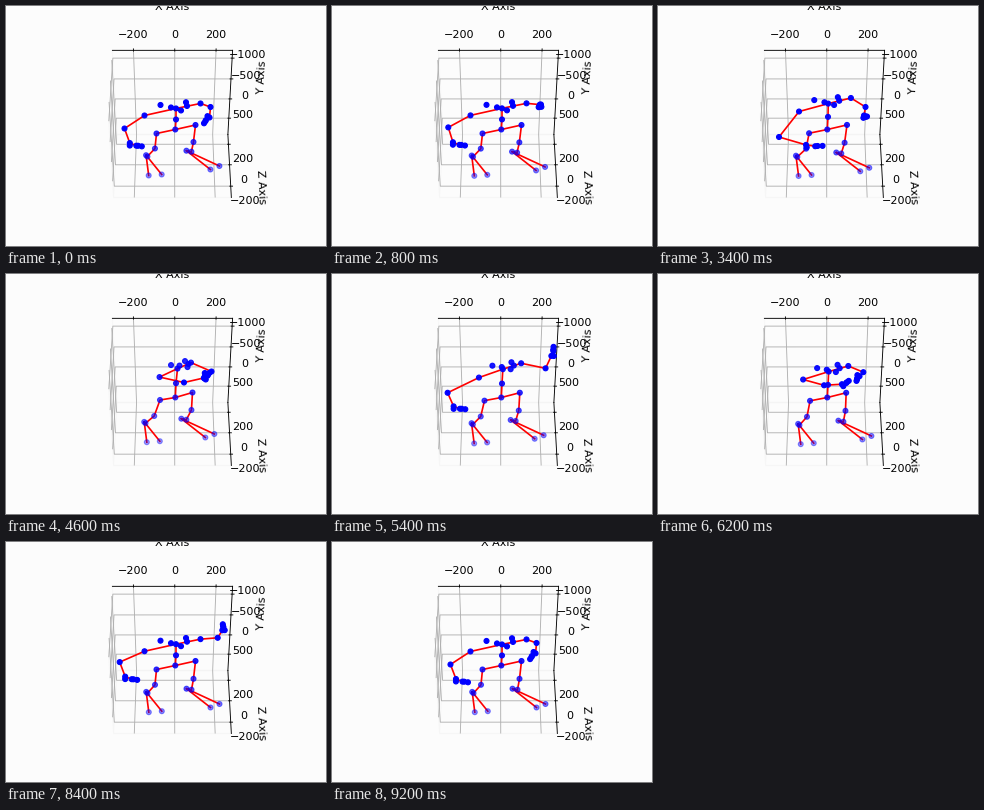
Animation, 320 px wide and 240 px high, one loop 9400 ms. Source, as a matplotlib script:

```python
import numpy as np
import matplotlib.pyplot as plt
from matplotlib.animation import FuncAnimation

FRAMES, STEP = 47, 200  # count, ms per frame
PAPER = "#fcfcfc"

# Standing pose in stage pixels, y pointing down
REST = {
    "pelvis": (168.8, 123), "spine": (169.5, 113), "neck": (169.5, 102),
    "l_shoulder": (138, 109), "r_shoulder": (194, 97),
    "l_hip": (150, 127), "r_hip": (189, 118.5),
    "l_knee": (148.5, 142), "l_ankle": (141, 150), "l_heel": (139.7, 148.7),
    "l_foot": (142.3, 169), "l_toe": (155.3, 168),
    "r_knee": (187, 135.5), "r_ankle": (185, 145.2), "r_heel": (180, 144.2),
    "r_foot": (204, 163), "r_toe": (213, 159.5),
}

# How far the trunk follows a full turn sideways and a full lift upwards
TURN = {"neck": (1.5, 0), "l_shoulder": (15, 0), "r_shoulder": (-9.5, 0),
        "l_hip": (3.5, -1.5), "r_hip": (-3, -.5)}
LIFT = {"neck": 8, "spine": 4.3, "l_shoulder": 6.5, "r_shoulder": 9}

# Head dots: offset from the neck and its change when the head turns
HEAD = [(-15.5, -3.5, 9, 0), (-5, -1, 7, -2), (5, 2, 5, -3.5),
        (10, -6.2, -2.5, -1.3), (11, -2.5, 0, -2)]

# Arm poses: elbow, wrist, fingertip
ARM = ("elbow", "wrist", "tip")
L_HANG = np.array([(118, 122), (123.5, 136.5), (135.5, 139.8)])
L_LOW = np.array([(120.5, 130.5), (151, 137), (167.5, 138)])
L_CROSS = np.array([(177.5, 108), (198.5, 103), (204, 98)])
R_HANG = np.array([(204, 100.5), (203, 111), (197.5, 116.8)])
R_LOW = np.array([(207, 100.5), (205.5, 109), (208.5, 110)])
R_CROSS = np.array([(205, 97), (200.5, 99.5), (198, 104)])
R_RAISED = np.array([(213, 94), (219, 82), (221, 73)])

CHAINS = [
    "pelvis spine neck", "neck l_shoulder l_elbow l_wrist l_mid",
    "neck r_shoulder r_elbow r_wrist r_mid",
    "pelvis l_hip l_knee l_ankle l_heel l_foot", "l_heel l_toe",
    "pelvis r_hip r_knee r_ankle r_heel r_foot", "r_heel r_toe",
]


def bump(t, peak, width):
    return np.exp(-((t - peak) / width) ** 2)


def turn_at(t):
    return bump(t, 4.6, .9) + .4 * bump(t, 6.2, .7)


def pose_trunk(t):
    turn, lift = turn_at(t), bump(t, 4.8, 2)
    p = {name: np.array(xy, float) for name, xy in REST.items()}
    for name, shift in TURN.items():
        p[name] += turn * np.array(shift)
    for name, rise in LIFT.items():
        p[name][1] -= rise * lift
    for k, (x, y, dx, dy) in enumerate(HEAD):
        p[f"head{k}"] = p["neck"] + (x + dx * turn, y + dy * turn)
    return p


def sway_legs(p, t):
    drift, dip, settle = bump(t, 2.8, 1.6), bump(t, 4.6, .8), 1 - bump(t, 0, 1)
    sway = {"l": np.array([-2.4 * drift - 1.3 * dip, .7 * settle - 2 * dip]),
            "r": np.array([-2 * drift - 4.6 * dip, 2 * settle - 2 * dip])}
    for side in "lr":
        p[side + "_knee"] += .4 * sway[side]
        for part in ("ankle", "heel", "foot", "toe"):
            p[f"{side}_{part}"] += sway[side]


def move_arms(p, t):
    low, drift = bump(t, 3.4, .35), bump(t, 2.8, 1.6)
    cross = bump(t, 4.6, .4) + .8 * bump(t, 6.2, .45)
    lift = (bump(t, 1.1, .3) + bump(t, 5.4, .3)
            + .8 * bump(t, 6.8, .25) + .8 * bump(t, 8.4, .35))
    left = L_HANG + low * (L_LOW - L_HANG) + cross * (L_CROSS - L_HANG)
    left += lift * np.array([-6, -3])
    left[1:] += drift * np.array([-4, 1.6])
    right = R_HANG + low * (R_LOW - R_HANG) + cross * (R_CROSS - R_HANG)
    right += lift * (R_RAISED - R_HANG)
    for side, arm in (("l", left), ("r", right)):
        for part, xy in zip(ARM, arm):
            p[f"{side}_{part}"] = xy
        add_hand(p, side)


def add_hand(p, side):
    wrist, tip = p[side + "_wrist"], p[side + "_tip"]
    along = tip - wrist
    across = np.array([-along[1], along[0]]) / max(np.hypot(*along), 1)
    for part, reach, spread in (("thumb", .05, 2.4), ("mid", .56, .8), ("ring", .7, .4)):
        p[f"{side}_{part}"] = wrist + reach * along + spread * across


def pose(t):
    p = pose_trunk(t)
    sway_legs(p, t)
    move_arms(p, t)
    return p


def shades(p, t):
    """Body dots fade towards the feet; the arms stay in front."""
    rgba = np.tile([0, 0, 1.0, 1.0], (len(p), 1))
    for row, (name, xy) in zip(rgba, p.items()):
        if name in REST or name.startswith("head"):
            fade = 1 - .0087 * (xy[1] - 105)
            row[3] = np.clip(fade, .4, 1) * (1 - .15 * turn_at(t))
    return rgba


fig = plt.figure(figsize=(4, 3), dpi=80, facecolor=PAPER)

# Axes box seen from below; the tiny turn fixes which side wall is drawn
box = fig.add_subplot(projection="3d", facecolor=PAPER)
box.view_init(elev=-45, azim=-89.99)
box.set(xlim=(-302, 280), ylim=(-1182, 939), zlim=(-303, 298),
        xticks=(-200, 0, 200), yticks=(-1000, -500, 0, 500), zticks=(-200, 0, 200),
        xlabel="X Axis", ylabel="Y Axis", zlabel="Z Axis")
for axis in (box.xaxis, box.yaxis, box.zaxis):
    axis.pane.set_facecolor(PAPER)
    axis.pane.set_edgecolor("#f2f2f2")

# Overlay whose whole coordinates fall on pixel centres
stage = fig.add_axes([0, 0, 1, 1], zorder=5)
stage.set(xlim=(-.5, 319.5), ylim=(239.5, -.5))
stage.axis("off")

bones, = stage.plot([], [], color="red", lw=1.5, zorder=2)
start = pose(0)
dots = stage.scatter(*np.array(list(start.values())).T, s=20,
                     c=shades(start, 0), zorder=3)


def draw(frame):
    t = frame * STEP / 1000
    p = pose(t)
    gap = np.full(2, np.nan)
    line = []
    for chain in CHAINS:
        line += [p[name] for name in chain.split()] + [gap]
    bones.set_data(*np.array(line).T)
    dots.set_offsets(list(p.values()))
    dots.set_facecolor(shades(p, t))
    dots.set_edgecolor("face")
    return bones, dots


anim = FuncAnimation(fig, draw, frames=FRAMES, interval=STEP,
                     repeat=True, repeat_delay=0, blit=False)
plt.show()
```
